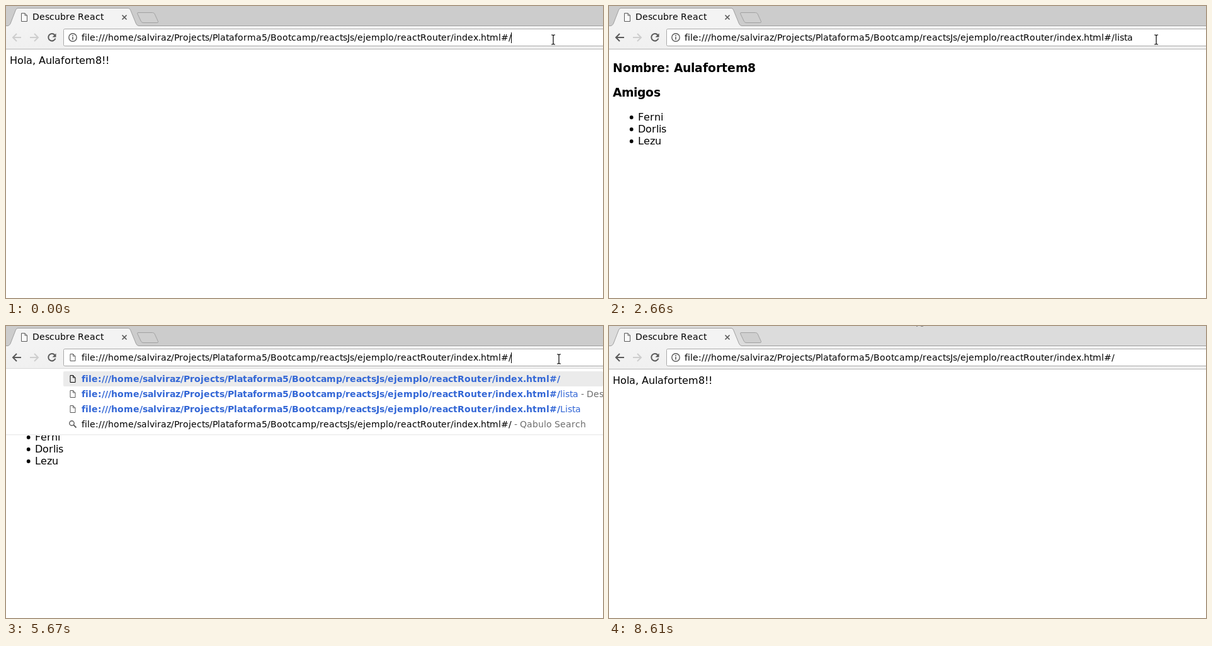
Recreate the animation shown at these times as an HTML page. Size 948 by 464 pixels, loop 8.82 s.

```html
<!DOCTYPE html>
<html lang="es">
<head>
<meta charset="utf-8">
<title>Descubre React</title>
<style>
  html, body { margin: 0; width: 100%; height: 100%; overflow: hidden; background: #fff; }
  svg { display: block; }
  text, tspan { white-space: pre; }
  text { font-family: "DejaVu Sans", sans-serif; font-kerning: none; font-variant-ligatures: none; }
</style>
</head>
<body>
<svg id="stage" width="948" height="464" viewBox="0 0 948 464">
  <defs>
    <linearGradient id="bar" x1="0" y1="0" x2="0" y2="1">
      <stop offset="0" stop-color="#f3f3f3"/><stop offset="1" stop-color="#f0f0f0"/>
    </linearGradient>
    <path id="doc" d="M.5.5H5L8.5 4V11.5H.5ZM5 .5V4H8.5" fill="none"/>
    <g id="beam" fill="none">
      <path d="M-3-7.5H-1L0-6.5 1-7.5H3M0-6.5V6.5M-3 7.5H-1L0 6.5 1 7.5H3" stroke="#fff" stroke-width="3"/>
      <path d="M-3-7.5H-1L0-6.5 1-7.5H3M0-6.5V6.5M-3 7.5H-1L0 6.5 1 7.5H3" stroke="#000" stroke-width="1.2"/>
    </g>
    <path id="arrow" d="M0 0V15L3.5 11.8 6 17.5 8.5 16.4 6 11H10.5Z" fill="#000" stroke="#fff"/>
  </defs>
  <rect width="948" height="464" fill="#fff"/>
  <rect id="strip" width="948" height="32"/>
  <path id="sliver" d="M488 .5H490M495 .5H499" stroke="#8a8a8a"/>
  <rect y="32" width="948" height="36" fill="url(#bar)"/>
  <path d="M0 68.5H948" stroke="#b6b6b6"/>
  <path d="M-1 31.5H3Q5.500 31 7 28L15.500 6Q16.500 3.500 19 3.500H194Q196.500 3.500 197.500 6L206.500 28Q208 31.500 211 31.500H949V33H-1Z" fill="#f3f3f3"/>
  <path d="M-1 31.5H3Q5.500 31 7 28L15.500 6Q16.500 3.500 19 3.500H194Q196.500 3.500 197.500 6L206.500 28Q208 31.500 211 31.500H949" fill="none" stroke="#a0a0a0"/>
  <path d="M210 10.500H232.500Q235 10.500 236 12.500L241.500 24.500Q242 26.500 240 26.500H218Q215.500 26.500 214.500 24.500L208.800 12.500Q208 10.500 210 10.500Z" fill="#cfcfcf" stroke="#a2a2a2"/>
  <path d="M24.500 11.500H30L33.500 15V24.500H24.500ZM30 11.500V15H33.500" fill="#fbfbfb" stroke="#5a5a5a"/>
  <path d="M184.500 14.500L191.500 21.500M191.500 14.500L184.500 21.500" stroke="#5a5a5a" stroke-width="1.7"/>
  <g fill="none" stroke-width="2">
    <path id="back" d="M24 50H11.500M17 44L11 50 17 56"/>
    <path d="M38 50H50.500M45 44L51 50 45 56" stroke="#cecece"/>
    <path d="M77.300 46A5.700 5.700 0 1 0 78.400 51.500" stroke="#5a5a5a"/>
  </g>
  <path d="M79.500 43.500V49.500H73.500Z" fill="#5a5a5a"/>
  <rect x="91.500" y="36.500" width="870" height="27" rx="2" fill="#fff" stroke="#a9a9a9"/>
  <g id="heading"></g>
  <g id="content"></g>
  <g id="popup"></g>
  <g id="omnibox"></g>
  <g id="pointer"></g>
</svg>
<script>
const LOOP = 8820, STEP = 70;
const BASE = 'file:///home/salviraz/Projects/Plataforma5/Bootcamp/reactsJs/ejemplo/reactRouter/index.html#';
const HISTORY = ['/lista', '/Lista', '/'];
const TITLES = { '/lista': ' - Descubre React', '/': ' - Descubre React' };
const BLUE = '#3367d6', GREY = '#6e6e6e';
const $ = id => document.getElementById(id);

// Glyphs advance by whole pixels, as hinted desktop text does.
const pen = document.createElement('canvas').getContext('2d');
const widths = {};
function advance(ch, font) {
  const key = font + ch;
  if (!(key in widths)) {
    pen.font = font;
    widths[key] = Math.round(pen.measureText(ch).width + 0.008);
  }
  return widths[key];
}

function textWidth(str, size = 14, weight = 400) {
  return [...str].reduce((sum, ch) => sum + advance(ch, `${weight} ${size}px "DejaVu Sans", sans-serif`), 0);
}

function text(x, y, runs, size = 14) {
  const spans = runs.filter(run => run[0]).map(([str, fill = '#000', weight = 400]) => {
    const xs = [...str].map(ch => {
      const at = x;
      x += textWidth(ch, size, weight);
      return at;
    });
    return `<tspan x="${xs.join(' ')}" fill="${fill}" font-weight="${weight}">${str}</tspan>`;
  });
  return `<text y="${y}" font-size="${size}">${spans.join('')}</text>`;
}

const docIcon = (y, color) => `<use href="#doc" x="101.500" y="${y - 6}" stroke="${color}"/>`;
const searchIcon = y => `<g fill="none" stroke="#5a5a5a"><circle cx="104.500" cy="${y - 1.5}" r="3.700" stroke-width="1.400"/>
  <path d="M107.200 ${y + 1.2}L111.500 ${y + 5.5}" stroke-width="1.800"/></g>`;
const infoIcon = `<circle cx="106" cy="50" r="6.200" fill="none" stroke="#5a5a5a" stroke-width="1.400"/>
  <path d="M106 49V53.500M106 46.300V47.900" stroke="#5a5a5a" stroke-width="1.600"/>`;

function popup(typed) {
  const matches = HISTORY.filter(item => item.startsWith(typed) && item !== typed);
  const rows = [typed, ...matches];
  const bottom = 72 + 24 * (rows.length + 1) + 4;
  const center = i => 84 + 24 * i;
  const last = center(rows.length);
  return `<rect y="67" width="948" height="${bottom - 67}" fill="#fff"/>
    <path d="M0 67.500H948" stroke="#d9d9d9"/>
    <path d="M0 ${bottom + 0.5}H948" stroke="#ececec"/>
    <path d="M0 ${bottom + 1.5}H948" stroke="#f6f6f6"/>
    <rect x="91" y="72" width="857" height="24" rx="2" fill="#ebebeb"/>` +
    rows.map((row, i) => docIcon(center(i), i ? '#5a5a5a' : '#000') + text(120, center(i) + 5, [
      [BASE + typed, BLUE, 700],
      [row.slice(typed.length), BLUE],
      [i ? TITLES[row] : '', GREY]
    ])).join('') +
    searchIcon(last) + text(120, last + 5, [[BASE + typed], [' - Qabulo Search', GREY]]);
}

function omnibox({ path, caret, select, open }) {
  const end = 120 + textWidth(BASE + path);
  let out = open ? docIcon(50, '#5a5a5a') : infoIcon;
  if (select) {
    const start = select === 'all' ? 120 : 120 + textWidth(BASE + '/');
    out += `<rect x="${start - 1}" y="42" width="${end - start}" height="17" fill="#c3dffb"/>`;
  }
  out += text(120, 55, [[BASE + path]]);
  if (caret) out += `<rect x="${end - 1}" y="42" width="1" height="17"/>`;
  return out;
}

const PAGES = {
  home: text(6, 92, [['Hola, Aulafortem8!!']], 16),
  list: text(6, 105, [['Nombre: Aulafortem8', '#000', 700]], 18.72) +
    text(6, 144, [['Amigos', '#000', 700]], 18.72) +
    ['Ferni', 'Dorlis', 'Lezu'].map((name, i) =>
      `<circle cx="35.700" cy="${177 + 19 * i}" r="2.900"/>` + text(46, 182 + 19 * i, [[name]], 16)).join('')
};

const EVENTS = [
  [0, { page: 'home', path: '/', caret: true, select: '', open: false, visited: false }],
  [490, { caret: false }],
  [980, { caret: true }],
  [1540, { caret: false }],
  [1680, { path: '/l', caret: true, open: true }],
  [1820, { path: '/li' }],
  [1890, { path: '/lis' }],
  [2030, { path: '/list' }],
  [2100, { path: '/lista' }],
  [2660, { page: 'list', caret: false, open: false, visited: true }],
  [4340, { caret: true }],
  [4410, { caret: false, select: 'all' }],
  [4550, { caret: true, select: '' }],
  [4690, { caret: false, select: 'word' }],
  [5670, { path: '/', caret: true, select: '', open: true }],
  [6090, { path: '' }],
  [6650, { page: 'home', path: '/', caret: false, open: false }]
];

// Pointer path: time, x, y
const MOVES = [
  [0, 869, 53.5], [3710, 869, 53.5], [3780, 869, 54.5], [3920, 869.5, 54.5], [3990, 872, 54.5],
  [4550, 872, 54.5], [4830, 878, 52.5], [6930, 878, 52.5], [7070, 877.5, 50.5], [7140, 877.5, 50.5],
  [7490, 800, 42], [7840, 590, 16], [8050, 506, -18]
];

function pointer(t) {
  if (t >= 8050) return '';
  const next = MOVES.findIndex(move => move[0] > t);
  const [t0, x0, y0] = MOVES[next - 1], [t1, x1, y1] = MOVES[next];
  const k = (t - t0) / (t1 - t0);
  const x = x0 + (x1 - x0) * k, y = y0 + (y1 - y0) * k;
  return `<use href="#${y > 36 ? 'beam' : 'arrow'}" x="${x}" y="${y}"/>`;
}

const drawn = {};
function put(id, markup) {
  if (drawn[id] === markup) return;
  drawn[id] = markup;
  $(id).innerHTML = markup;
}

function render(time) {
  const t = Math.floor(time % LOOP / STEP) * STEP;
  const state = Object.assign({}, ...EVENTS.filter(event => event[0] <= t).map(event => event[1]));
  const fade = Math.min(1, Math.max(0, (t - 8050) / 560));
  const shade = Math.round(204 + 16 * fade);
  $('strip').setAttribute('fill', `rgb(${shade},${shade},${shade})`);
  $('sliver').setAttribute('opacity', fade);
  $('back').setAttribute('stroke', state.visited ? '#5a5a5a' : '#cecece');
  put('heading', text(42, 22, [['Descubre React']]));
  put('content', PAGES[state.page]);
  put('popup', state.open ? popup(state.path) : '');
  put('omnibox', omnibox(state));
  put('pointer', pointer(t));
}

const start = performance.now();
function tick() {
  render(performance.now() - start);
  requestAnimationFrame(tick);
}
tick();
</script>
</body>
</html>
```
